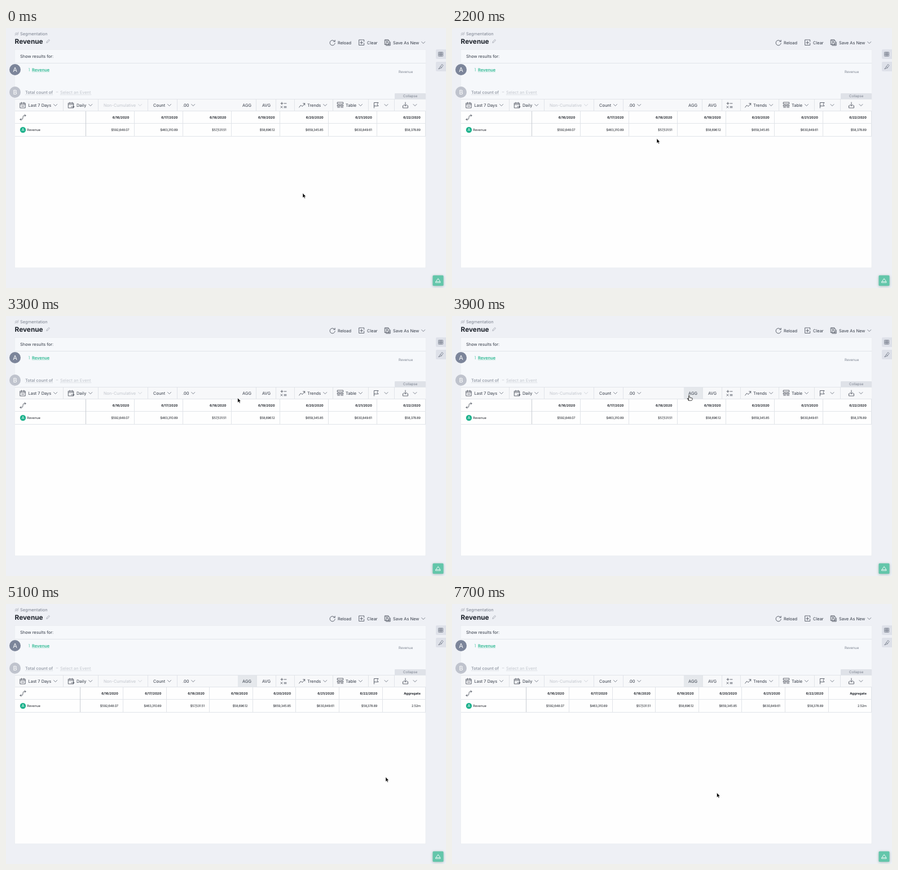
Animation, 780 px wide and 462 px high, one loop 8000 ms. Source, as an HTML page:

```html
<!DOCTYPE html>
<html lang="en">
<head>
<meta charset="utf-8">
<title>Revenue table</title>
<style>
  html, body { margin: 0; width: 100%; height: 100%; overflow: hidden; background: #eef0f5; }
  svg { display: block; width: 780px; height: 462px; font: 7.45px Inter, sans-serif; text-rendering: geometricPrecision; }
  text { fill: #343b47; }
  .icon { fill: none; stroke: #3a414d; stroke-width: .8; stroke-linecap: round; stroke-linejoin: round; }
  .line { fill: none; stroke: #e1e4e9; shape-rendering: crispEdges; }
  .edge { stroke: #c9ccd2; }
  .title { font-size: 11.8px; font-weight: 700; fill: #1d222b; }
  .grey { fill: #7b828f; }
  .small { font-size: 6.2px; fill: #7b828f; }
  .medium { font-weight: 500; fill: #8d94a0; }
  .pale { fill: #c3c7ce; }
  .link { font-weight: 600; fill: #2bb891; }
  .badge { font-size: 11px; fill: #fff; text-anchor: middle; }
  .cell, .head { font-size: 5.8px; fill: #22262d; }
  .head { font-weight: 700; }
  .amount { letter-spacing: -.28px; }
  .end { text-anchor: end; }
</style>
</head>
<body>
<svg viewBox="0 0 780 462">
  <rect x="15.5" y="38.5" width="728.5" height="387.5" fill="#fefefe" stroke="#e6e9ee" stroke-width=".6"/>
  <rect x="16" y="39" width="728" height="88" fill="#f6f8fb"/>
  <rect x="16" y="127" width="728" height="21" fill="#f7f8fa"/>
  <rect x="689" y="116" width="55" height="10.5" rx="1" fill="#dfe2e8"/>
  <rect id="agg" x="411" y="127" width="34" height="20.5"/>
  <path class="line" d="M16 62.5H744M16 126.5H744M16 147.5H744M16 169.5H744M16 192.5H744"/>
  <rect x="762" y="38" width="20" height="17" rx="2" fill="#dee1e9"/>
  <rect x="762" y="60" width="20" height="17" rx="2" fill="#dee1e9"/>
  <rect x="756.5" y="439.5" width="19" height="18.5" rx="1.5" fill="#63c6aa" style="filter: drop-shadow(0 1px 2px #9db8b5)"/>
  <path d="M46 77.9h31" stroke="#8edac5" stroke-width=".7"/>
  <path d="M34 118.6h50M96 118.6h56" stroke="#b8bdc7" stroke-width=".7" stroke-dasharray="1 1"/>
  <circle cx="16" cy="74" r="10" fill="#7c859a"/>
  <circle cx="16" cy="114" r="10" fill="#bfc3cd"/>
  <circle cx="30" cy="181" r="5.2" fill="#1fb28d"/>
  <g id="content"></g>
  <g id="status">
    <rect x="-4" y="450.5" width="250" height="16" rx="2" fill="#fff" stroke="#b4b7bd" stroke-width=".8"/>
    <text x="86" y="458.8" class="end" style="font-size: 6.9px">Establishing secure connection...</text>
  </g>
  <path id="arrow" d="M0 0V8L2 6.4 3.1 9.3 4.5 8.7 3.3 5.9H5.7z" stroke="#fff" stroke-width=".5"/>
  <path id="hand" class="icon" style="fill: #fff; stroke: #111" d="M-1.5 5V-3.5q.8-1 1.6 0V0L5 1V3.5L3.8 5.2H-1.5L-4 1.8l1-.6 1.5 1.3"/>
</svg>
<script>
const $ = id => document.getElementById(id);
const content = $('content');
const add = markup => {
  content.insertAdjacentHTML('beforeend', markup);
  return content.lastElementChild;
};
const text = (x, y, str, cls = '') => add(`<text x="${x}" y="${y}" class="${cls}">${str}</text>`);
const path = (x, y, d, color = '#3a414d') =>
  add(`<path class="icon" transform="translate(${x} ${y})" stroke="${color}" style="stroke:${color}" d="${d}"/>`);
const divider = (x, y0, y1, cls = '') =>
  add(`<path class="line ${cls}" d="M${Math.floor(x) + .5} ${y0}V${y1}"/>`);
const chevron = (x, y, color = '#5b6370') => path(x, y, 'M-3-1.5l3 3 3-3', color);

// Icons start at their top left corner
const calendar = 'M0 1.5h9V10H0zM0 4h9M2.5 0v2.5M6.5 0v2.5';
const zigzag = 'M0 3l2-2 2 1.5L6 0';
const icons = {
  calendar: calendar + 'M2.5 7h4',
  schedule: calendar + 'M5 8h5L8.5 6.5M10 8L8.5 9.5',
  math: 'M0 2h4M2 0v4M6 2h4M0 7l3 3M3 7l-3 3M6 7.5h4M6 9.5h4',
  trend: 'M0 9l3-4 2.5 2.5L10 2M7 2h3v3',
  table: 'M0 0h10v3H0zM0 5h4v2H0zM6 5h4v2H6zM0 9h4M6 9h4',
  flag: 'M0 10V.5h7.5l-2 3 2 3H0',
  download: 'M5 0v6.5M2.5 4L5 6.5 7.5 4M2 6H.5v4h9V6H8',
  pivot: 'M0 9h3q2 0 2-3.500t2-3.500h3M8 0l2 2-2 2M2 7L0 9l2 2',
  reload: 'M9 3A4.600 4.600 0 1 0 9.600 6M9.500 .5V3H7',
  clear: 'M5 0H0v9.500h9V6M4.500 2.500v5M2 5h5M6 0h3v3',
  save: 'M0 0h6l2 2v6.500H0zM2 0v3h3.500V0M2 8.500V5h4v3.500M2 10h7.500V4',
  pencil: 'M0 6l.5-2L4 .5 5.500 2 2 5.500z',
  books: 'M0 0h2.500v7H0zM2.500 0H5v7H2.500zM5 0h2.500v7H5zM0 3.500h7.500',
  marker: 'M0 8l3-4 2 2zM3 4l3-4 2 2-3 4',
  bell: 'M0 8h8V6H0zM1 6q0-4 3-4t3 4M4 2V.5',
};
const icon = (name, x, y, color) => path(x, y, icons[name], color);

// A label, its icon, and a chevron and divider that follow its end
function control(x, y, label, { glyph, menu = true, bar = y > 100, pad = 21, cls = '' } = {}) {
  const end = x + text(x, y + 2.8, label, cls).getComputedTextLength();
  if (glyph) icon(glyph, x - 14.3, y - 5);
  if (menu) chevron(end + 7.4, y, cls && '#c3c7ce' || undefined);
  if (bar) divider(end + pad, 127, 147);
}

path(16, 7.5, zigzag, '#989ea9');
path(16, 10, zigzag, '#989ea9');
icon('pencil', 72, 20, '#989ea9');
text(25, 12.7, 'Segmentation', 'grey');
text(15.6, 27.8, 'Revenue', 'title');
control(588, 26, 'Reload', { glyph: 'reload', menu: false });
control(640, 26, 'Clear', { glyph: 'clear', menu: false });
control(686, 26, 'Save As New', { glyph: 'save' });
text(25, 52.6, 'Show results for:');
text(16, 78, 'A', 'badge');
text(16, 118, 'B', 'badge');
text(30, 183.4, 'A', 'badge').style.fontSize = '6.8px';
path(40.6, 71.6, 'M0 0h.8v5', '#68cfb2');
text(46, 76.5, 'Revenue', 'link');
text(696, 80.3, 'Revenue', 'small');
text(34, 116.6, 'Total count of', 'medium');
path(89, 113.8, 'M0 0h3', '#c9cdd5');
text(96, 116.6, 'Select an Event', 'pale');
text(704, 123.4, 'Collapse', 'small');

control(39.5, 137, 'Last 7 Days', { glyph: 'calendar' });
control(125, 137, 'Daily', { glyph: 'schedule' });
control(173, 137, 'Non-Cumulative', { cls: 'pale' });
control(261, 137, 'Count');
control(313, 137, '.00', { bar: false });
control(419, 137, 'AGG', { menu: false, pad: 9 });
control(454, 137, 'AVG', { menu: false, pad: 9 });
icon('math', 487, 132);
divider(511, 127, 147);
control(534, 137, 'Trends', { glyph: 'trend' });
control(602, 137, 'Table', { glyph: 'table' });
icon('flag', 652.5, 132);
chevron(674, 137);
divider(688, 127, 147);
icon('download', 703, 132);
chevron(725, 137);

icon('pivot', 25, 153.5);
icon('books', 767, 43, '#6a7180');
icon('marker', 767, 64.5, '#6a7180');
icon('bell', 762, 444.5, '#fff');
text(37.3, 183.1, 'Revenue', 'cell');

const amounts = ['$592,648.07', '$463,310.89', '$57,531.51', '$58,696.12', '$659,345.85', '$630,849.61', '$58,378.89'];
const days = amounts.map((amount, i) => [`6/${16 + i}/2020`, amount]);

function table(left, columns) {
  const step = (743.6 - left) / columns.length;
  const parts = [divider(left, 148, 192, 'edge')];
  columns.forEach(([head, amount], i) => {
    const right = left + step * (i + 1);
    parts.push(divider(right, 148, 192),
      text(right - 8.7, 161, head, 'head end'),
      text(right - 8.9, 183.1, amount, 'cell amount end'));
  });
  const group = add('<g></g>');
  group.append(...parts);
  return group;
}
const plain = table(141, days);
const summed = table(131, [...days, ['Aggregate', '2.52m']]);

// Pointer moves: start and end time, target, optional bend
const moves = [
  [300, 500, [402, 314]],
  [900, 1200, [163, 279]],
  [1600, 1900, [267, 255]],
  [2000, 2200, [363, 196.5]],
  [2500, 3400, [415, 145.5], [240, 152]],
  [3400, 3600, [421, 145]],
  [4600, 5500, [704, 193], [641, 560]],
  [5500, 5800, [697, 181]],
  [5900, 6300, [717, 175]],
  [6400, 6800, [703, 179], [715, 182]],
  [7100, 7700, [469.5, 335.5]],
];
function pointer(t) {
  let at = [526, 293.5];
  for (const [begin, end, to, bend] of moves) {
    if (t <= begin) break;
    const left = (1 - Math.min(1, (t - begin) / (end - begin))) ** 2, k = 1 - left;
    at = at.map((from, i) => {
      const via = bend ? bend[i] : (from + to[i]) / 2;
      return left * left * from + 2 * left * k * via + k * k * to[i];
    });
  }
  return at;
}

const show = (node, on) => node.style.display = on ? '' : 'none';
const start = performance.now();
function draw(now) {
  const elapsed = Math.max(0, now - start) % 8000;
  const t = Math.floor(elapsed / 100) * 100;
  const hovering = t >= 3500 && t < 4700;
  show(plain, t < 4000);
  show(summed, t >= 4000);
  show($('status'), t >= 4100 && t < 4400);
  show($('hand'), hovering);
  show($('arrow'), !hovering);
  $('agg').setAttribute('fill', t >= 3800 ? '#e5e8ec' : hovering ? '#eef0f4' : 'none');
  for (const id of ['hand', 'arrow']) $(id).setAttribute('transform', `translate(${pointer(t)})`);
  requestAnimationFrame(draw);
}
draw(start);
</script>
</body>
</html>
```
